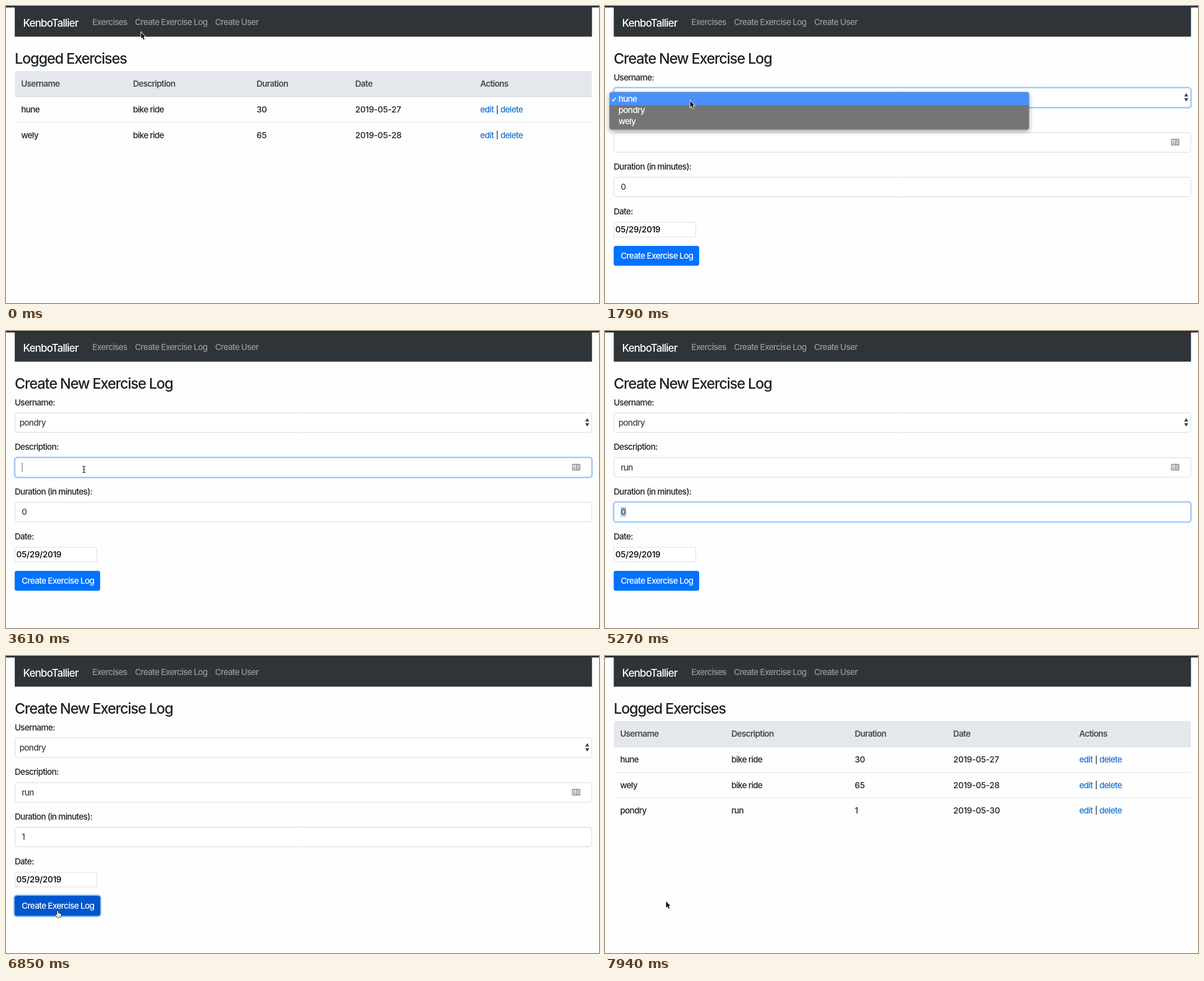
Write an HTML page with a canvas that moves like this. It is 1058 by 530 pixels and loops after 8 s.

```html
<!DOCTYPE html>
<html lang="en">
<head>
<meta charset="utf-8">
<title>Exercise log</title>
<style>
html, body { margin: 0; width: 100%; height: 100%; overflow: hidden; background: #fff; }
canvas { display: block; }
</style>
</head>
<body>
<canvas id="stage" width="1058" height="530"></canvas>
<script>
const ctx = document.getElementById('stage').getContext('2d');
const LOOP = 8000;
const INK = '#1d2125';
const INPUT_INK = '#40464c';
const users = ['hune', 'pondry', 'wely'];

// Moments of the story, in ms
const T = {
  hover: 110, form: 620, unhover: 850, icon: 900, selectFocus: 1500, menuOpen: 1630,
  nextItem: 2330, menuClose: 2560, descFocus: 3140, caret: 3600,
  type: [3995, 4155, 4385], tab: 4700, digit: 5425, caretOff: 5975, caretOn: 6440,
  buttonHover: 6560, press: 6700, blank: 6995, header: 7155, rows: 7235
};

// Pointer path: time, x, y of the hot spot
const path = [
  [0, 241, 47], [70, 243, 44], [220, 248, 38], [770, 248, 38], [1150, 205, 112],
  [1550, 152, 169], [2190, 152, 170], [2450, 147, 187], [2600, 146, 190],
  [2900, 139, 247], [6220, 139, 247], [6640, 92, 455], [7155, 92, 455],
  [7235, 96, 452], [7860, 96, 452], [7935, 109, 438], [LOOP, 109, 438]
];

const clamp = v => Math.max(0, Math.min(1, v));
const ease = v => v * v * (3 - 2 * v);
const fade = (t, start, length = 150) => ease(clamp((t - start) / length));

function pointerAt(t) {
  const i = Math.max(1, path.findIndex(p => p[0] > t));
  const [a, b] = [path[i - 1], path[i]];
  const k = ease(clamp((t - a[0]) / (b[0] - a[0])));
  return [a[1] + (b[1] - a[1]) * k, a[2] + (b[2] - a[2]) * k];
}

// Words are set tighter than figures
function text(str, x, y, { color = INK, size = 15, weight = 450 } = {}) {
  const track = /^\d/.test(str) ? -0.019 : -0.049;
  ctx.font = `${weight} ${size}px Inter, sans-serif`;
  ctx.letterSpacing = `${size * track}px`;
  ctx.fillStyle = color;
  ctx.fillText(str, x, y);
}

function rect(x, y, w, h, color) {
  ctx.fillStyle = color;
  ctx.fillRect(x, y, w, h);
}

function round(x, y, w, h, r, fill, stroke, line = 1) {
  ctx.beginPath();
  ctx.roundRect(x, y, w, h, r);
  if (fill) { ctx.fillStyle = fill; ctx.fill(); }
  if (stroke) { ctx.strokeStyle = stroke; ctx.lineWidth = line; ctx.stroke(); }
}

function poly(points, fill, stroke, line = 1) {
  ctx.beginPath();
  points.forEach(([x, y]) => ctx.lineTo(x, y));
  ctx.closePath();
  if (stroke) { ctx.strokeStyle = stroke; ctx.lineWidth = line; ctx.stroke(); }
  ctx.fillStyle = fill;
  ctx.fill();
}

function navbar(active) {
  rect(15.6, 2, 1029.9, 52.7, '#2f3438');
  text('KenboTallier', 30.5, 36.5, { color: '#fff', size: 18.7 });
  const dim = '#96999b';
  text('Exercises', 154, 34.3, { color: dim });
  text('Create Exercise Log', 230, 34.3, { color: active ? '#d2d3d4' : dim });
  text('Create User', 373, 34.3, { color: dim });
}

const heading = str => text(str, 15.5, 102.5, { size: 26, weight: 550 });

function table(entries, cols) {
  heading('Logged Exercises');
  rect(16, 116, 1029, 46, '#e4e7eb');
  rect(16, 161, 1029, 1.5, '#d9dde1');
  ['Username', 'Description', 'Duration', 'Date', 'Actions'].forEach((h, i) =>
    text(h, cols[i], 144.3, { weight: 620, color: '#454b52' }));
  entries.forEach((entry, row) => {
    const y = 190.3 + row * 45.3;
    if (row) rect(16, y - 28.3, 1029, 1, '#dfe3e6');
    entry.forEach((cell, i) => text(cell, cols[i], y));
    text('edit', 846, y, { color: '#1a73d6' });
    text('|', 874.3, y - 0.5, { size: 13 });
    text('delete', 882, y, { color: '#1a73d6' });
  });
}

function field(y, focus) {
  if (focus > 0) round(15, y - 0.6, 1031, 36.2, 5, null, `rgba(0,123,255,${0.28 * focus})`, 2.6);
  round(16, y, 1029, 35, 4, '#fff', '#d3d7db');
  if (focus > 0) round(16, y, 1029, 35, 4, null, `rgba(120,180,250,${focus})`);
}

function contactIcon() {
  round(1009.7, 237, 15, 12, 1.5, '#9a9b9d');
  rect(1011.5, 239, 5.5, 8, '#fff');
  ctx.fillStyle = '#9a9b9d';
  ctx.beginPath();
  ctx.arc(1014.2, 241.2, 1.4, 0, 7);
  ctx.fill();
  rect(1012.2, 243.5, 4, 2.5, '#9a9b9d');
  for (let y = 239.5; y < 247; y += 2.8) rect(1018.5, y, 4.5, 1.2, '#fff');
}

function menu(t) {
  const chosen = t < T.nextItem ? 0 : 1;
  ctx.save();
  ctx.globalAlpha = 1 - fade(t, T.menuClose, 120);
  ctx.save();
  ctx.shadowColor = 'rgba(0,0,0,.4)';
  ctx.shadowBlur = 9;
  ctx.shadowOffsetY = 3;
  round(8, 153.5, 748.5, 67, 4, '#757575');
  ctx.restore();
  ctx.save();
  ctx.beginPath();
  ctx.roundRect(8, 153.5, 748.5, 67, 4);
  ctx.clip();
  if (chosen) rect(8, 177, 748.5, 20, '#4a90fb');
  else rect(8, 154, 748.5, 23, '#4a90fb');
  ctx.restore();
  ctx.strokeStyle = '#fff';
  ctx.lineWidth = 1.5;
  ctx.beginPath();
  ctx.moveTo(12.5, 167);
  ctx.lineTo(14.8, 169.7);
  ctx.lineTo(19, 163.5);
  ctx.stroke();
  users.forEach((name, i) => text(name, 24, 171 + i * 20, { color: '#fff' }));
  ctx.restore();
}

function button(t) {
  const over = t >= T.buttonHover, focus = fade(t, T.press, 120);
  if (focus > 0) round(14.8, 427.2, 153.8, 37.2, 5, null, `rgba(60,145,255,${0.6 * focus})`, 3);
  round(15.5, 428, 152.5, 35.5, 4, t >= T.press ? '#0056cc' : over ? '#0064dc' : '#0072ff');
  text('Create Exercise Log', 28, 451, { color: '#fff' });
}

function form(t) {
  heading('Create New Exercise Log');
  ['Username:', 'Description:', 'Duration (in minutes):', 'Date:'].forEach((label, i) =>
    text(label, 15.5, 132.5 + i * 79.9));

  field(146, fade(t, T.selectFocus, 100) - fade(t, T.descFocus));
  text(users[t < T.menuClose ? 0 : 1], 24, 168.7, { color: INPUT_INK });
  poly([[1033.3, 161.5], [1037, 155.5], [1040.7, 161.5]], '#3c4248');
  poly([[1033.3, 164.5], [1037, 170.5], [1040.7, 164.5]], '#3c4248');

  field(226, fade(t, T.descFocus) - fade(t, T.tab));
  const typed = 'run'.slice(0, T.type.filter(at => t >= at).length);
  text(typed, 28, 248.7, { color: INPUT_INK });
  if (t >= T.caret && t < T.tab)
    rect([28.5, 34.5, 41.5, 49.5][typed.length], 235, 1, 16.5, '#555b61');
  if (t >= T.icon) contactIcon();

  field(305.5, fade(t, T.tab) - fade(t, T.press));
  if (t >= T.tab + 50 && t < T.digit) rect(28, 314, 9.5, 17.5, '#a9cdf8');
  text(t < T.digit ? '0' : '1', 28, 328.4, { color: INPUT_INK });
  const blink = t >= T.digit && t < T.caretOff || t >= T.caretOn && t < T.press;
  if (blink) rect(36, 314.5, 1, 16.5, '#555b61');

  round(16, 386, 146, 26, 0, '#fff', '#dcdcdc');
  text('05/29/2019', 18.5, 404, { color: '#000' });
  button(t);
  if (t >= T.menuOpen && t < T.menuClose + 120) menu(t);
}

function arrow() {
  poly([[0, 0], [0, 11], [2.5, 8.8], [4.3, 13], [6.2, 12.2], [4.4, 8.1], [7.6, 8]],
    '#111', '#fff', 1.8);
}

function hand() {
  poly([[-1, 0], [0.8, 0], [1.3, 4], [5, 4.8], [6.3, 6], [6, 9], [4.8, 11.5], [0, 11.5],
    [-3.3, 7.2], [-2.6, 6], [-0.6, 7]], '#fff', '#111', 1.6);
  rect(1.4, 7, 0.7, 3, '#555');
  rect(3.4, 7, 0.7, 3, '#555');
}

function iBeam() {
  rect(-0.6, -5.5, 1.2, 11, '#222');
  rect(-2.6, -6, 5.2, 1.1, '#222');
  rect(-2.6, 5, 5.2, 1.1, '#222');
  rect(-2, -0.2, 4, 0.9, '#222');
}

function pointer(t) {
  if (t >= T.type[0] && t < 6220) return;
  const [x, y] = pointerAt(t);
  const onLink = t >= T.hover && t < T.unhover;
  const onButton = t >= T.buttonHover && t < T.header;
  const inField = [226, 305.5, 386].some(top => y > top && y < top + 35);
  const onForm = t >= T.form && t < T.blank;
  ctx.save();
  ctx.translate(x, y);
  if (onLink || onButton) hand();
  else if (onForm && inField) iBeam();
  else arrow();
  ctx.restore();
}

function draw(t) {
  rect(0, 0, 1058, 530, '#fefefe');
  rect(0, 0, 1058, 2.6, '#222b33');
  if (t < T.blank || t >= T.header) navbar(t >= T.hover && t < T.unhover);
  const entries = [
    [users[0], 'bike ride', '30', '2019-05-27'],
    [users[2], 'bike ride', '65', '2019-05-28'],
    [users[1], 'run', '1', '2019-05-30']
  ];
  if (t < T.form) table(entries.slice(0, 2), [27, 226.5, 447, 623, 846]);
  else if (t < T.blank) form(t);
  else if (t >= T.header) table(t < T.rows ? [] : entries, [27, 225.5, 445.5, 621.3, 846]);
  pointer(t);
}

const start = performance.now();
function tick() {
  draw((performance.now() - start) % LOOP);
  requestAnimationFrame(tick);
}
tick();
</script>
</body>
</html>
```
